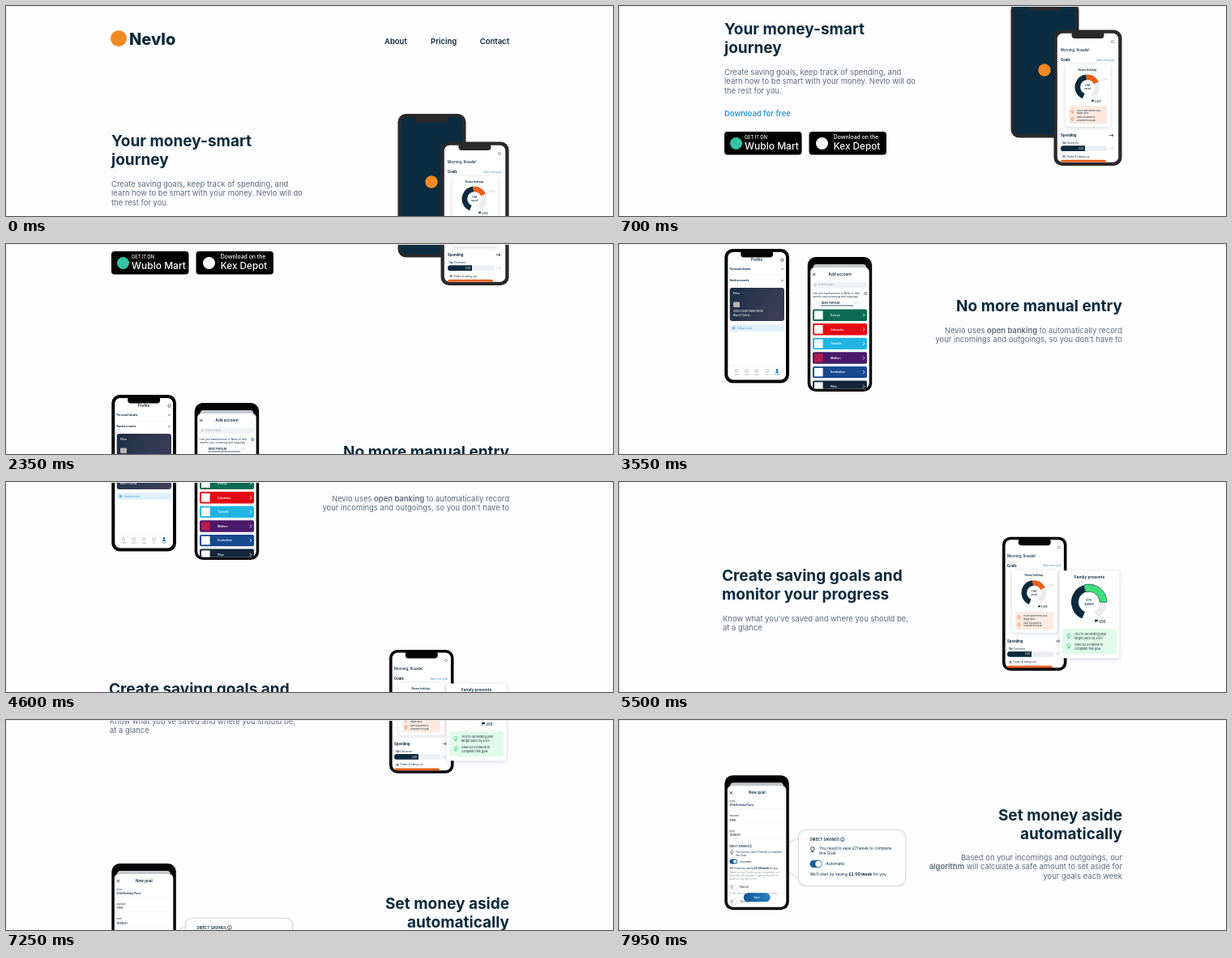
Recreate the animation shown at these times as an HTML page with a canvas. Size 749 by 259 pixels, loop 8000 ms.

```html
<!DOCTYPE html>
<html lang="en">
<head>
<meta charset="utf-8">
<title>Landing page scroll</title>
<style>
html, body { margin: 0; width: 100%; height: 100%; overflow: hidden; background: #fefdff; }
canvas { display: block; width: 749px; height: 259px; }
</style>
</head>
<body>
<canvas id="stage"></canvas>
<script>
const W = 749, H = 259, LOOP = 8000, STEP = 50;
const NAVY = '#0b2a3c', GREY = '#5f6b75', PALE = '#b4bbc2', BLUE = '#2f95d8';
const ORANGE = '#ea5f1a', GREEN = '#3fe07c', LINE = '#e9ebef', BG = '#fefdff';

const canvas = document.getElementById('stage');
const ratio = window.devicePixelRatio || 1;
canvas.width = W * ratio;
canvas.height = H * ratio;
const g = canvas.getContext('2d');

// [time, scroll offset]; equal neighbours are pauses
const SCROLL = [
  [0, 0], [100, 0], [150, 42], [200, 81], [300, 81], [700, 138], [1150, 191], [1250, 192.5],
  [1400, 192.5], [1850, 193], [2100, 224], [2350, 284], [2600, 284], [2650, 288], [2900, 288],
  [2950, 360], [3050, 360], [3100, 434], [3500, 434], [3550, 464], [3650, 464], [3750, 474],
  [3900, 474], [4600, 550], [4750, 572], [4900, 596], [5000, 596], [5050, 612], [5200, 612],
  [5650, 728], [5850, 728], [6000, 740], [6100, 740], [6750, 758], [6950, 782], [7350, 881],
  [7500, 881], [7550, 885], [7650, 885], [7950, 965]
];

function scrollAt(time) {
  const t = Math.floor(time / STEP) * STEP;
  const i = SCROLL.findIndex(k => k[0] >= t);
  if (i <= 0) return SCROLL[0][1];
  const [t0, s0] = SCROLL[i - 1], [t1, s1] = SCROLL[i];
  return s0 + (s1 - s0) * (t - t0) / (t1 - t0);
}

// y is the middle of the capitals
function text(s, x, y, size, color = NAVY, weight = 400, align = 'left') {
  g.font = `${weight} ${size}px Inter, sans-serif`;
  g.textAlign = align;
  g.fillStyle = color;
  g.fillText(s, x, y + size * 0.36);
}

// runs: [string, weight] pairs, laid out from x or ending at x
function runs(parts, x, y, size, color, alignRight) {
  const widths = parts.map(([s, w]) => {
    g.font = `${w} ${size}px Inter, sans-serif`;
    return g.measureText(s).width;
  });
  if (alignRight) x -= widths.reduce((a, b) => a + b, 0);
  parts.forEach(([s, w], i) => {
    text(s, x, y, size, color, w);
    x += widths[i];
  });
}

function box(x, y, w, h, r, fill, stroke, width = 1) {
  g.beginPath();
  g.roundRect(x, y, w, h, r);
  if (fill) { g.fillStyle = fill; g.fill(); }
  if (stroke) { g.strokeStyle = stroke; g.lineWidth = width; g.stroke(); }
}

function dot(x, y, r, fill) {
  g.beginPath();
  g.arc(x, y, r, 0, 7);
  g.fillStyle = fill;
  g.fill();
}

function ring(x, y, r, color = NAVY, width = 0.6) {
  g.beginPath();
  g.arc(x, y, r, 0, 7);
  g.strokeStyle = color;
  g.lineWidth = width;
  g.stroke();
}

function path(points, color = NAVY, width = 0.8) {
  g.beginPath();
  points.forEach(([x, y]) => g.lineTo(x, y));
  g.strokeStyle = color;
  g.lineWidth = width;
  g.stroke();
}

function shadowCard(x, y, w, h, r) {
  g.save();
  g.shadowColor = 'rgba(30,50,80,.2)';
  g.shadowBlur = 5 * ratio;
  g.shadowOffsetY = ratio;
  box(x, y, w, h, r, '#fff');
  g.restore();
}

function clipTo(x, y, w, h, r, draw) {
  g.save();
  g.beginPath();
  g.roundRect(x, y, w, h, r);
  g.clip();
  draw();
  g.restore();
}

function cross(x, y, r = 1.7) {
  path([[x - r, y - r], [x + r, y + r]]);
  path([[x - r, y + r], [x + r, y - r]]);
}

function info(x, y, r) {
  ring(x, y, r, NAVY, r * 0.28);
  path([[x, y - r * 0.1], [x, y + r * 0.6]], NAVY, r * 0.3);
  dot(x, y - r * 0.5, r * 0.18, NAVY);
}

function bulb(x, y, r, color) {
  ring(x, y - r * 0.3, r * 0.65, color, r * 0.25);
  path([[x - r * 0.35, y + r * 0.7], [x + r * 0.35, y + r * 0.7]], color, r * 0.35);
}

function flag(x, y, s) {
  path([[x, y - s], [x, y + s]], NAVY, s * 0.3);
  g.fillStyle = NAVY;
  g.fillRect(x, y - s, s * 1.7, s * 1.2);
}

function arc(x, y, r, width, from, to, color) {
  g.beginPath();
  g.arc(x, y, r, from * Math.PI / 180, to * Math.PI / 180);
  g.strokeStyle = color;
  g.lineWidth = width;
  g.stroke();
}

function donut(x, y, outer, inner, mid, end, color) {
  const r = (outer + inner) / 2, w = outer - inner;
  arc(x, y, r, w, end, 420, '#ececef');
  arc(x, y, r, w, 113, mid, NAVY);
  arc(x, y, r, w, mid, end, color);
}

function toggle(x, y, w, h, on) {
  box(x, y, w, h, h / 2, on ? '#11609f' : '#fff', on ? null : '#c9ced6', 0.6);
  dot(on ? x + w - h / 2 : x + h / 2, y + h / 2, h / 2 - 0.8, on ? '#fff' : '#c9ced6');
}

function phone(x, y, w, h, frame, edge, screen, notch) {
  box(x, y, w, h, 10, frame);
  box(x + edge, y + edge, w - 2 * edge, h - 2 * edge, 6.5, screen);
  if (notch) box(x + w / 2 - 20, y + 2, 40, 8.5, 4, frame);
}

// phone with a sheet pulled up over a dimmed page
function sheetPhone(x, y, title) {
  box(x, y, 79.5, 166, 10, '#050505');
  box(x + 7, y + 9, 65.5, 10, 4, '#c4c8cc');
  box(x + 3.5, y + 13, 72.5, 149.5, [5, 5, 7, 7], '#fff');
  cross(x + 8, y + 21.5);
  text(title, x + 40, y + 21.5, 4.6, NAVY, 600, 'center');
}

function dashboard(x, y) {
  g.save();
  g.translate(x, y);
  ring(68, 10, 1.6, '#77828c', 0.7);
  text('Morning, Rosalie!', 4, 20.5, 4.3, NAVY, 500);
  text('Goals', 4, 32.5, 4.2, NAVY, 700);
  text('Start new goal', 70, 32.5, 3.2, BLUE, 400, 'right');

  shadowCard(10, 38, 56, 77, 3);
  text('Rome holiday', 37, 44.5, 3.5, NAVY, 600, 'center');
  donut(37, 66, 15.5, 8.8, 264, 335, ORANGE);
  text('£168', 37, 64.3, 2.9, NAVY, 500, 'center');
  text('saved', 37, 67.8, 2.9, NAVY, 500, 'center');
  text('£200', 54.5, 57, 2.9, PALE);
  flag(42.5, 83.2, 1.5);
  text('£300', 46, 83.5, 3.1, NAVY, 500);
  box(14, 89, 47, 22.5, 2.5, '#fde9e0');
  bulb(18.5, 96.5, 2.3, ORANGE);
  bulb(18.5, 105.5, 2.3, ORANGE);
  text("You're £89 behind your", 24, 94.8, 2.65);
  text('target pace', 24, 98.2, 2.65);
  text('Save £25/week to', 24, 103.4, 2.65);
  text('complete this goal', 24, 106.8, 2.65);

  text('Spending', 4, 125.5, 4.2, NAVY, 700);
  path([[64, 125.5], [69, 125.5]], NAVY, 0.7);
  path([[67, 123.7], [69, 125.5], [67, 127.3]], NAVY, 0.7);
  path([[6, 133.5], [7, 133.8], [7.7, 136], [9.7, 136], [10.2, 134.4], [7.3, 134.4]], NAVY, 0.6);
  text('Groceries', 11.5, 135, 3.2);
  box(4, 138.3, 58, 6.8, 3.4, '#eceff2');
  box(4, 138.3, 30, 6.8, [3.4, 0, 0, 3.4], NAVY);
  text('£20', 32, 141.7, 3, '#fff', 500, 'right');
  text('£40', 70, 141.7, 3, PALE, 400, 'right');
  cross(8, 151.5, 1.4);
  text('Drinks & eating out', 11.5, 151.5, 3.15);
  box(4, 155.8, 56, 6, 2.5, ORANGE);
  g.restore();
}

function storeBadge(x, color, iconX, textX, small, smallSize, big, bigSize) {
  box(x, 293, 95.5, 28.5, 4, '#000');
  dot(iconX, 307.5, 7.5, color);
  text(small, textX, 299.7, smallSize, '#fff', 500);
  text(big, textX, 310.3, bigSize, '#fff', 500);
}

function hero() {
  dot(139, 40, 10, '#f08a24');
  text('Nevlo', 152, 40.5, 20, NAVY, 800);
  text('About', 467, 44, 9.5, NAVY, 600);
  text('Pricing', 524, 44, 9.5, NAVY, 600);
  text('Contact', 621, 44, 9.5, NAVY, 600, 'right');

  text('Your money-smart', 130, 166.5, 19, NAVY, 700);
  text('journey', 130, 189.5, 19, NAVY, 700);
  text('Create saving goals, keep track of spending, and', 130, 219.3, 9.45, GREY);
  text('learn how to be smart with your money. Nevlo will do', 130, 230.8, 9.45, GREY);
  text('the rest for you.', 130, 242.3, 9.45, GREY);
  text('Download for free', 130, 270.5, 9.45, BLUE, 600);
  storeBadge(130, '#35c3a5', 144.5, 155, 'GET IT ON', 5.6, 'Wublo Mart', 12);
  storeBadge(234.5, '#fff', 250.5, 264.8, 'Download on the', 6.9, 'Kex Depot', 11.7);

  phone(483.5, 133, 84, 167.5, '#2b2829', 4, '#0b2b40', true);
  dot(525, 217, 7.7, '#f08a24');
  phone(536.5, 167.5, 84, 167.5, '#2b2829', 4.3, '#fff', true);
  clipTo(541, 172, 75, 158.5, 6, () => dashboard(541, 172));
}

function profilePhone() {
  phone(130.3, 6, 79.7, 165.5, '#050505', 4, '#fff', true);
  text('Profile', 170, 19.5, 4.6, NAVY, 600, 'center');
  ring(201.5, 19.7, 1.6, NAVY, 0.7);
  [['Personal details', 31], ['Bank accounts', 45]].forEach(([s, y], i) => {
    text(s, 136.5, y, 3.3, NAVY, 700);
    const d = i ? 0.7 : -0.7;
    path([[200, y + d], [201.5, y - d], [203, y + d]], NAVY, 0.7);
  });
  path([[136.5, 38], [204, 38]], LINE, 0.6);

  const paint = g.createLinearGradient(137, 54, 204, 95);
  paint.addColorStop(0, '#1c2d45');
  paint.addColorStop(0.6, '#333b54');
  paint.addColorStop(1, '#413d55');
  box(136.7, 54, 67.3, 41, 3, paint);
  text('Pilvo', 141, 61, 3.5, '#fff', 500);
  box(141, 71.5, 8, 6.5, 1.2, '#bdb6ad');
  text('0000 0000 0000 0000', 141, 82.8, 3.3, '#fff', 500);
  text('Miss R Ostlow', 141, 88.3, 3, '#fff', 500);

  box(136.7, 99.3, 67.3, 8.8, 2.5, '#e0f1fc');
  ring(141.5, 103.7, 1.5, BLUE, 0.6);
  path([[140.6, 103.7], [142.4, 103.7]], BLUE, 0.6);
  path([[141.5, 102.8], [141.5, 104.6]], BLUE, 0.6);
  text('Add account', 145.5, 103.7, 3.2, BLUE);

  path([[134.5, 151], [206, 151]], LINE, 0.6);
  ['Home', 'Spend', 'Goals', 'Tips', 'Profile'].forEach((s, i) => {
    const x = 145 + 12.5 * i, c = i === 4 ? '#1769aa' : '#8b959e';
    if (i === 4) {
      dot(x, 155.4, 1.3, c);
      box(x - 2, 157, 4, 2, [2, 2, 0, 0], c);
    } else if (i % 2) box(x - 1.8, 154.8, 3.6, 3.4, 0.7, null, c, 0.6);
    else ring(x, 156.4, 1.7, c);
    text(s, x, 161.5, 2.1, c, 400, 'center');
  });
}

const BANKS = [
  ['Dovrys', '#0b6b50', '#fff'], ['Calvandro', '#e50914', '#fff'], ['Tarwells', '#20b5e5', '#fff'],
  ['Midfern', '#4c1a6a', '#b51c4d'], ['Everhollow', '#17498f', '#fff'], ['Pilvo', '#14263c', '#fff']
];

function accountPhone() {
  sheetPhone(232.7, 16, 'Add account');
  box(239, 46.8, 67, 7.2, 2, '#eff1f4');
  ring(242.3, 50.1, 1.1, '#98a1aa', 0.5);
  text('Search banks', 246, 50.4, 3, '#a2aab2');
  text('Link your bank account to Nevlo to help', 239, 60.8, 3.1);
  text('monitor your incomings and outgoings', 239, 65, 3.1);
  info(304.3, 61, 1.7);
  text('MOST POPULAR', 250, 72.5, 2.8, NAVY, 700);
  text('A-Z', 290, 72.5, 2.8, PALE, 500);
  path([[239, 76], [306, 76]], LINE, 0.5);
  path([[249, 76], [289, 76]], NAVY, 0.7);
  clipTo(236.2, 78, 72.5, 100.5, [0, 0, 7, 7], () => BANKS.forEach(([name, fill, mark], i) => {
    const y = 87.7 + 17.6 * i;
    box(239, y - 7.2, 67, 14.4, 2, fill);
    g.fillStyle = mark;
    g.fillRect(241, y - 5.3, 10.6, 10.6);
    text(name, 261, y, 3.35, '#fff', 600);
    path([[301, y - 2], [303, y], [301, y + 2]], '#fff', 0.8);
  }));
}

function banking() {
  profilePhone();
  accountPhone();
  text('No more manual entry', 621, 76.5, 19, NAVY, 700, 'right');
  runs([['Nevlo uses ', 400], ['open banking', 600], [' to automatically record', 400]], 621, 106.2, 9.45, GREY, true);
  text("your incomings and outgoings, so you don't have to", 621, 117.7, 9.45, GREY, 400, 'right');
}

function saving() {
  text('Create saving goals and', 127, 46.8, 19, NAVY, 700);
  text('monitor your progress', 127, 69.8, 19, NAVY, 700);
  text("Know what you've saved and where you should be,", 128, 99.7, 9.45, GREY);
  text('at a glance', 128, 111.2, 9.45, GREY);

  phone(473, -1, 79.5, 165, '#050505', 3.6, '#fff', true);
  clipTo(476.5, 2.5, 72.5, 158, 6, () => dashboard(475, 2));

  shadowCard(543.5, 40.5, 74, 108, 4);
  text('Family presents', 580.5, 48.3, 4.9, NAVY, 600, 'center');
  text('£70', 570, 54.5, 3.9, PALE, 400, 'center');
  donut(580, 79.5, 22, 13, 252, 360, GREEN);
  g.beginPath();
  g.arc(580, 79.5, 22, 252 * Math.PI / 180, 0);
  g.arc(580, 79.5, 13, 0, 252 * Math.PI / 180, true);
  g.closePath();
  g.strokeStyle = NAVY;
  g.lineWidth = 0.6;
  g.stroke();
  text('£70', 580, 77.3, 4, NAVY, 500, 'center');
  text('saved', 580, 82, 4, NAVY, 500, 'center');
  flag(587.5, 103, 2);
  text('£90', 592.5, 103.5, 4.2, NAVY, 500);
  box(547, 112, 67, 31.5, 3.5, '#e1fbea');
  bulb(555, 121.5, 3, '#2fc26b');
  bulb(555, 134, 3, '#2fc26b');
  text("You're exceeding your", 562, 119, 3.75);
  text('target pace by £30!', 562, 123.8, 3.75);
  text('Save £2.50/week to', 562, 131.7, 3.75);
  text('complete this goal', 562, 136.5, 3.75);
}

function goalPhone() {
  sheetPhone(130.3, 68.3, 'New goal');
  [['GOAL', '20th Birthday Party', 100.2], ['AMOUNT', '£100', 118.5], ['DATE', '15/08/21', 136.8]].forEach(([label, value, y]) => {
    text(label, 136.5, y, 2.6, NAVY, 500);
    text(value, 136.5, y + 5, 3.2, NAVY, 600);
    path([[136.5, y + 9.5], [204, y + 9.5]], LINE, 0.5);
  });
  text('DIRECT SAVINGS', 136.5, 155.5, 2.85, NAVY, 600);
  info(162.3, 155.5, 1.5);
  bulb(139.2, 163.5, 2.4, NAVY);
  text('You need to save £7/week to complete', 144, 162.4, 3.1);
  text('this Goal', 144, 166.4, 3.1);
  toggle(136.5, 171.6, 9.6, 5.8, true);
  text('Automatic', 149, 174.6, 3.1);
  runs([["We'll start by saving ", 400], ['£2.50/week', 700], [' for you.', 400]], 136.5, 182.6, 3.1, NAVY);
  ['Based on your incomings and outgoings, our', 'algorithm will calculate a safe amount to set', 'aside for you each week']
    .forEach((s, i) => text(s, 136.5, 188.3 + 4 * i, 2.9, '#8d969f'));
  toggle(136.5, 203, 9.6, 5.8, false);
  text('Manual', 149, 206, 3.1);
  text('£  Set your own amount to save each week', 136.5, 213.8, 2.9, '#8d969f');
  toggle(136.5, 221, 9.6, 5.8, false);
  text('Turn off', 149, 224, 3.1);
  const paint = g.createLinearGradient(154, 0, 187, 0);
  paint.addColorStop(0, '#10588f');
  paint.addColorStop(1, '#2b80c6');
  box(153.7, 213.3, 33, 11, 5.5, paint);
  text('Save', 170, 218.8, 3.1, '#fff', 500, 'center');
}

function automatic() {
  path([[210, 151], [222, 145.5]], '#cfd4dd', 0.9);
  path([[210, 188], [222, 196]], '#cfd4dd', 0.9);
  goalPhone();
  box(221.3, 135.5, 132.5, 69.3, 9, '#fefeff', '#cfd4dd', 1.1);
  text('DIRECT SAVINGS', 235.5, 147.3, 4.35, NAVY, 600);
  info(275.8, 147.3, 2.4);
  bulb(238.8, 160, 3.5, NAVY);
  text('You need to save £7/week to complete', 247, 158.2, 4.9);
  text('this Goal', 247, 164.2, 4.9);
  toggle(235.5, 173, 15, 9, true);
  text('Automatic', 255.3, 177.7, 4.95);
  runs([["We'll start by saving ", 400], ['£2.50/week', 700], [' for you', 400]], 235.5, 190, 4.9, NAVY);

  text('Set money aside', 621, 117, 19, NAVY, 700, 'right');
  text('automatically', 621, 140, 19, NAVY, 700, 'right');
  text('Based on your incomings and outgoings, our', 621, 169.3, 9.45, GREY, 400, 'right');
  runs([['algorithm', 600], [' will calculate a safe amount to set aside for', 400]], 621, 180.8, 9.45, GREY, true);
  text('your goals each week', 621, 192.3, 9.45, GREY, 400, 'right');
}

const SECTIONS = [[hero, 0, 340], [banking, 464, 190], [saving, 758, 170], [automatic, 965, 240]];

function draw(time) {
  const offset = scrollAt(time);
  g.setTransform(ratio, 0, 0, ratio, 0, 0);
  g.fillStyle = BG;
  g.fillRect(0, 0, W, H);
  for (const [section, top, height] of SECTIONS) {
    const y = top - offset;
    if (y > H || y + height < 0) continue;
    g.save();
    g.translate(0, y);
    section();
    g.restore();
  }
  g.fillStyle = '#ececef';
  g.fillRect(0, 0, W, 1);
  g.fillRect(0, 0, 1, H);
}

const start = performance.now();
function frame() {
  draw((performance.now() - start) % LOOP);
  requestAnimationFrame(frame);
}
frame();
</script>
</body>
</html>
```
